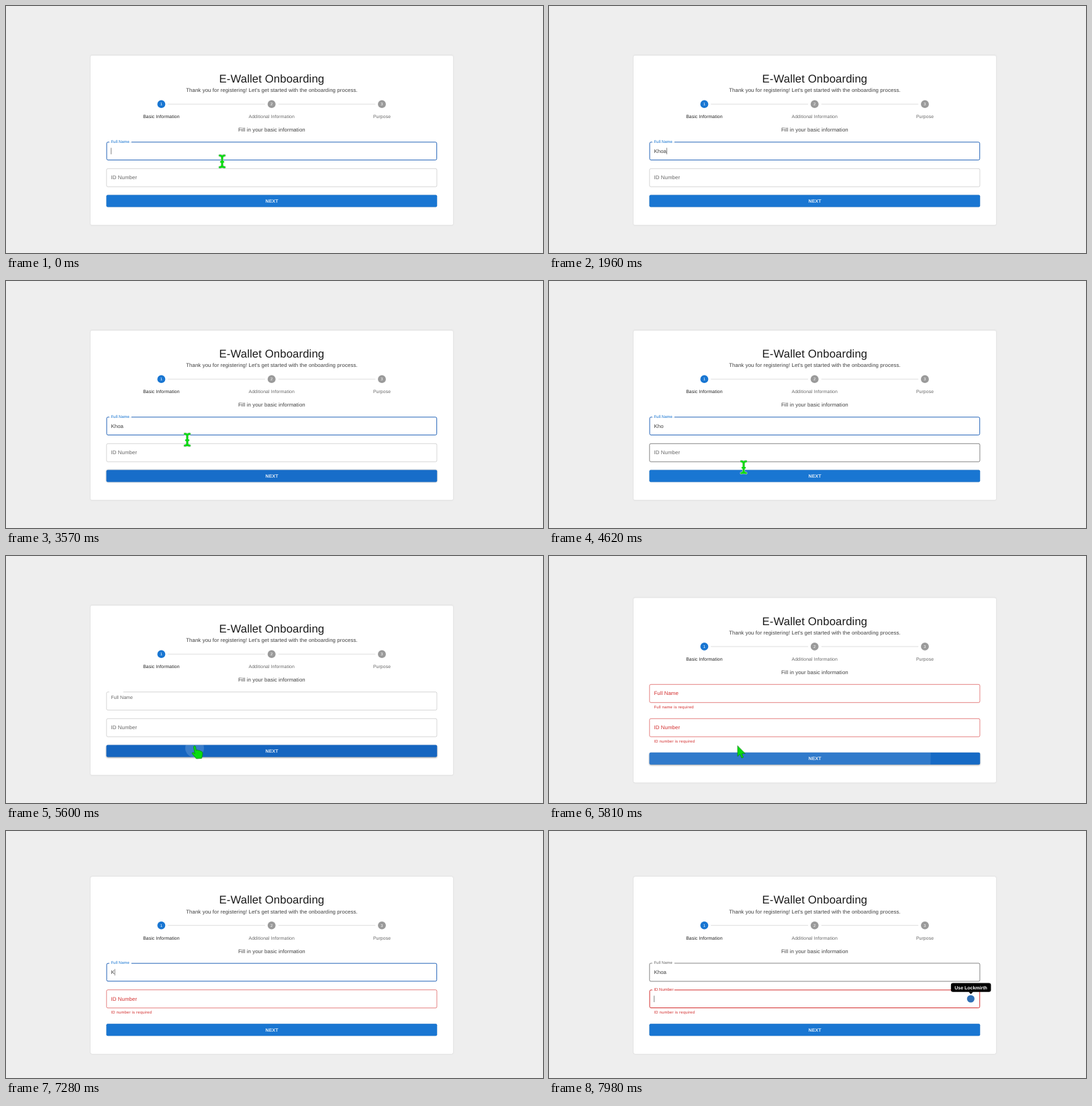
An HTML page that plays this animation: 800 by 368 pixels, repeating every 8000 ms.

```html
<!DOCTYPE html>
<html lang="en">
<head>
<meta charset="utf-8">
<title>E-Wallet Onboarding</title>
<style>
  html, body { margin: 0; width: 100%; height: 100%; overflow: hidden; background: #eee; }
  svg { display: block; width: 800px; height: 368px; }
  text { font-family: "Liberation Sans", Arial, sans-serif; text-rendering: geometricPrecision; fill: rgba(0,0,0,.76); }
  .mid { text-anchor: middle; }
  .h4 { font-size: 16.7px; letter-spacing: .00735em; fill: rgba(0,0,0,.9); }
  .body { font-size: 7.88px; letter-spacing: .00938em; }
  .step { font-size: 6.9px; letter-spacing: .01071em; fill: rgba(0,0,0,.6); }
  .step.on { fill: rgba(0,0,0,.87); }
  .num { font-size: 5.9px; fill: #fff; }
  .label { letter-spacing: .00938em; }
  .help { font-size: 5.91px; letter-spacing: .03333em; fill: #d32f2f; }
  .next { font-size: 6.9px; letter-spacing: .02857em; fill: #fff; stroke: #fff; stroke-width: .2px; }
  .tip { font-size: 7px; font-weight: bold; fill: #fff; }
  .paper { fill: #fff; filter: drop-shadow(0 .6px .6px rgba(0,0,0,.2)) drop-shadow(0 .5px 1.2px rgba(0,0,0,.1)); }
  .line { stroke: #bdbdbd; stroke-width: .5; }
  .cursor path { stroke-linejoin: round; stroke-linecap: round; }
</style>
</head>
<body>
<svg viewBox="0 0 800 368">
  <defs><clipPath id="clip"><rect x="149.5" y="281.6" width="492.7" height="17.9" rx="2"/></clipPath></defs>
  <rect id="card" class="paper" x="126" width="540" rx="2"/>
  <g id="head">
    <text class="h4 mid" x="395.9" y="113.8">E-Wallet Onboarding</text>
    <text class="body mid" x="395.9" y="128.2">Thank you for registering! Let's get started with the onboarding process.</text>
    <path class="line" d="M241.2 146.2H386M405.7 146.2H550.2"/>
    <g id="steps"></g>
    <text class="body mid" x="395.9" y="187.3">Fill in your basic information</text>
  </g>
  <g id="fields"></g>
  <g id="button">
    <rect id="face" x="149.5" y="281.6" width="492.7" height="17.9" rx="2"/>
    <circle id="ripple" cx="281" cy="286" fill="#fff" clip-path="url(#clip)"/>
    <text class="next mid" x="396.1" y="293">NEXT</text>
  </g>
  <g id="tooltip">
    <circle cx="628.3" cy="250" r="5.6" fill="#2f6fb5"/>
    <rect x="598.8" y="226.6" width="59.6" height="13.2" rx="3"/>
    <path d="M625 239.5h7l-3.5 3.6z"/>
    <text class="tip mid" x="628.5" y="235.6">Use Lockmirth</text>
  </g>
  <g id="beam" class="cursor" fill="none">
    <path stroke="#b9c4b9" stroke-width="4" d="M-3.6 .8Q0 .8 0 4V15Q0 18.2-3.6 18.2M3.6 .8Q0 .8 0 4M0 15Q0 18.2 3.6 18.2"/>
    <path stroke="#08dc10" stroke-width="2.6" d="M-3.6 .8Q0 .8 0 4V15Q0 18.2-3.6 18.2M3.6 .8Q0 .8 0 4M0 15Q0 18.2 3.6 18.2M-2 10.2H2"/>
  </g>
  <g id="hand" class="cursor">
    <path fill="#08dc10" stroke="#0a7d12" stroke-width=".7" d="M-1.6 1.2C-1.6-.6 1.4-.6 1.6 1.2L2.4 6.5C4 5.6 5.4 6 5.8 7C7.2 6.4 8.6 6.8 9 8C10.4 7.8 11.6 8.6 11.8 10C12.2 13 11.4 15.5 10.4 18.5L2.6 19C1 16.5-2 14-3.6 11.5C-4.4 10-2.6 9-1.2 10.2L0 11.4Z"/>
  </g>
  <g id="arrow" class="cursor">
    <path fill="#08dc10" stroke="#0a7d12" stroke-width=".7" d="M0 0V15.5L3.6 12.2L6 18L8.6 16.9L6.2 11.3H11Z"/>
  </g>
</svg>
<script>
const LOOP = 8000, TICK = 70, GROW = 11.26;
const LEFT = 149.5, WIDTH = 492.7, HEIGHT = 27.6;
const BLUE = '#1976d2', RED = '#d32f2f';
const NAME = 'Khoa';

// [time, letters shown in the name field]
const typing = [[0, 0], [1050, 1], [1260, 2], [1470, 3], [1820, 4], [4060, 3],
  [4830, 2], [4970, 1], [5110, 0], [7210, 1], [7330, 2], [7450, 3], [7570, 4]];
// [time, x, y] of the pointer tip
const path = [[0, 322, 222], [2080, 322, 222], [2400, 318, 250], [2900, 300, 288],
  [3430, 279, 286], [3570, 270, 227], [3780, 268, 222], [4480, 289, 265], [4620, 290, 268],
  [4900, 290, 268], [5250, 281, 283], [5880, 281, 283], [6370, 266, 200], [8000, 266, 200]];
const CLICK = 5550, ERRORS = 5740, REFOCUS = 6505, FIXED = 7210, TAB = 7770;

const $ = id => document.getElementById(id);
const clamp = v => Math.max(0, Math.min(1, v));
const ramp = (t, start, length) => clamp((t - start) / length);
const easeOut = p => 1 - (1 - p) ** 3;
const mix = (a, b, p) => a + (b - a) * p;
const within = (t, a, b) => t >= a && t < b;
const show = (el, on) => el.setAttribute('visibility', on ? 'visible' : 'hidden');
const shift = (el, x, y) => el.setAttribute('transform', `translate(${x} ${y})`);

function add(parent, tag, attrs, text = '') {
  const el = document.createElementNS('http://www.w3.org/2000/svg', tag);
  set(el, attrs);
  el.textContent = text;
  return parent.appendChild(el);
}
function set(el, attrs) {
  for (const key in attrs) el.setAttribute(key, attrs[key]);
}

['Basic Information', 'Additional Information', 'Purpose'].forEach((title, i) => {
  const x = 231.4 + i * 164.3, g = $('steps');
  add(g, 'circle', { cx: x, cy: 146.2, r: 5.9, fill: i ? '#9a9a9a' : BLUE });
  add(g, 'text', { x, y: 148.3, class: 'num mid' }, i + 1);
  add(g, 'text', { x, y: 167.4, class: i ? 'step mid' : 'step on mid' }, title);
});

function makeField(title, help) {
  const g = add($('fields'), 'g', {});
  return {
    g,
    box: add(g, 'rect', { fill: 'none', rx: 2 }),
    notch: add(g, 'rect', { y: -1, height: 2.4, fill: '#fff' }),
    label: add(g, 'text', { x: 156.4, class: 'label' }, title),
    value: add(g, 'text', { x: 156.4, y: 16.4, class: 'body' }),
    caret: add(g, 'rect', { y: 9, width: .7, height: 9.6, fill: '#555' }),
    help: add(g, 'text', { x: 156.4, y: 35.6, class: 'help' }, help)
  };
}
const nameField = makeField('Full Name', 'Full name is required');
const idField = makeField('ID Number', 'ID number is required');

function drawField(f, s) {
  shift(f.g, 0, s.y);
  const w = s.focus ? 1 : .6;
  set(f.box, {
    x: LEFT + w / 2, y: w / 2, width: WIDTH - w, height: HEIGHT - w, 'stroke-width': w,
    stroke: s.error ? RED : s.focus ? '#2464b8' : s.hover ? 'rgba(0,0,0,.8)' : 'rgba(0,0,0,.27)'
  });
  set(f.notch, { x: 153.8, width: 33 * clamp(s.shrink * 1.5) });
  set(f.label, {
    y: mix(16.4, 1.8, s.shrink), 'font-size': mix(7.88, 5.91, s.shrink),
    style: `fill:${s.error ? RED : s.focus ? BLUE : 'rgba(0,0,0,.6)'}`
  });
  f.value.textContent = s.value;
  show(f.caret, s.focus && s.caret);
  f.caret.setAttribute('x', 156.4 + (s.value ? f.value.getComputedTextLength() : 0));
  show(f.help, s.error);
}

function pointer(t) {
  const i = path.findIndex(p => p[0] > t);
  const [t0, x0, y0] = path[i - 1], [t1, x1, y1] = path[i];
  const p = (t - t0) / (t1 - t0);
  return [mix(x0, x1, p), mix(y0, y1, p)];
}

function draw(t) {
  const nameError = within(t, ERRORS, FIXED), idError = t >= ERRORS;
  const top = -(nameError + idError) * GROW / 2;
  const nameY = 202.3 + top;
  const idY = 242 + top + nameError * GROW;
  const buttonShift = -top;

  set($('card'), { y: 73.6 + top, height: 252.8 - 2 * top });
  shift($('head'), 0, top);

  const [x, y] = pointer(t);
  const overName = within(y, nameY, nameY + HEIGHT);
  const overId = within(y, idY, idY + HEIGHT);
  const overButton = within(y, 281.6 + buttonShift, 299.5 + buttonShift);

  const nameFocus = t < CLICK || within(t, REFOCUS, TAB);
  const edits = [-300, ...typing.slice(1).map(k => k[0]), REFOCUS, TAB];
  const lastEdit = Math.max(...edits.filter(e => e <= t));
  const caret = (t - lastEdit) % 1000 < 500;
  const letters = typing.filter(k => k[0] <= t).pop()[1];

  drawField(nameField, {
    y: nameY, error: nameError, hover: overName, focus: nameFocus, caret,
    value: NAME.slice(0, letters),
    shrink: t < REFOCUS ? 1 - easeOut(ramp(t, CLICK, 200)) : easeOut(ramp(t, REFOCUS, 200))
  });
  drawField(idField, {
    y: idY, error: idError, hover: overId, focus: t >= TAB, caret, value: '',
    shrink: easeOut(ramp(t, TAB, 200))
  });

  const hot = ramp(t, 2780, 250) - ramp(t, 3450, 250) + ramp(t, 5220, 250) - ramp(t, ERRORS, 250);
  shift($('button'), 0, buttonShift);
  $('face').style.fill = `rgb(${mix(25, 21, hot)},${mix(118, 101, hot)},${mix(210, 192, hot)})`;
  $('face').style.filter =
    `drop-shadow(0 ${mix(.6, 1.2, hot)}px ${mix(.6, 1.3, hot)}px rgba(0,0,0,${mix(.25, .4, hot)}))`;
  set($('ripple'), {
    r: 14 + 340 * easeOut(ramp(t, 5600, 500)),
    opacity: t < CLICK ? 0 : .16 * (1 - ramp(t, 5670, 450))
  });

  show($('tooltip'), t >= 7840);

  const visible = t < 1050 || within(t, 2100, FIXED);
  const kind = overButton ? 'hand' : overName || overId ? 'beam' : 'arrow';
  for (const id of ['beam', 'hand', 'arrow']) {
    show($(id), visible && id === kind);
    shift($(id), x, y);
  }
}

const start = performance.now();
function frame() {
  const t = (performance.now() - start) % LOOP;
  draw(Math.floor(t / TICK) * TICK);
  requestAnimationFrame(frame);
}
frame();
</script>
</body>
</html>
```
